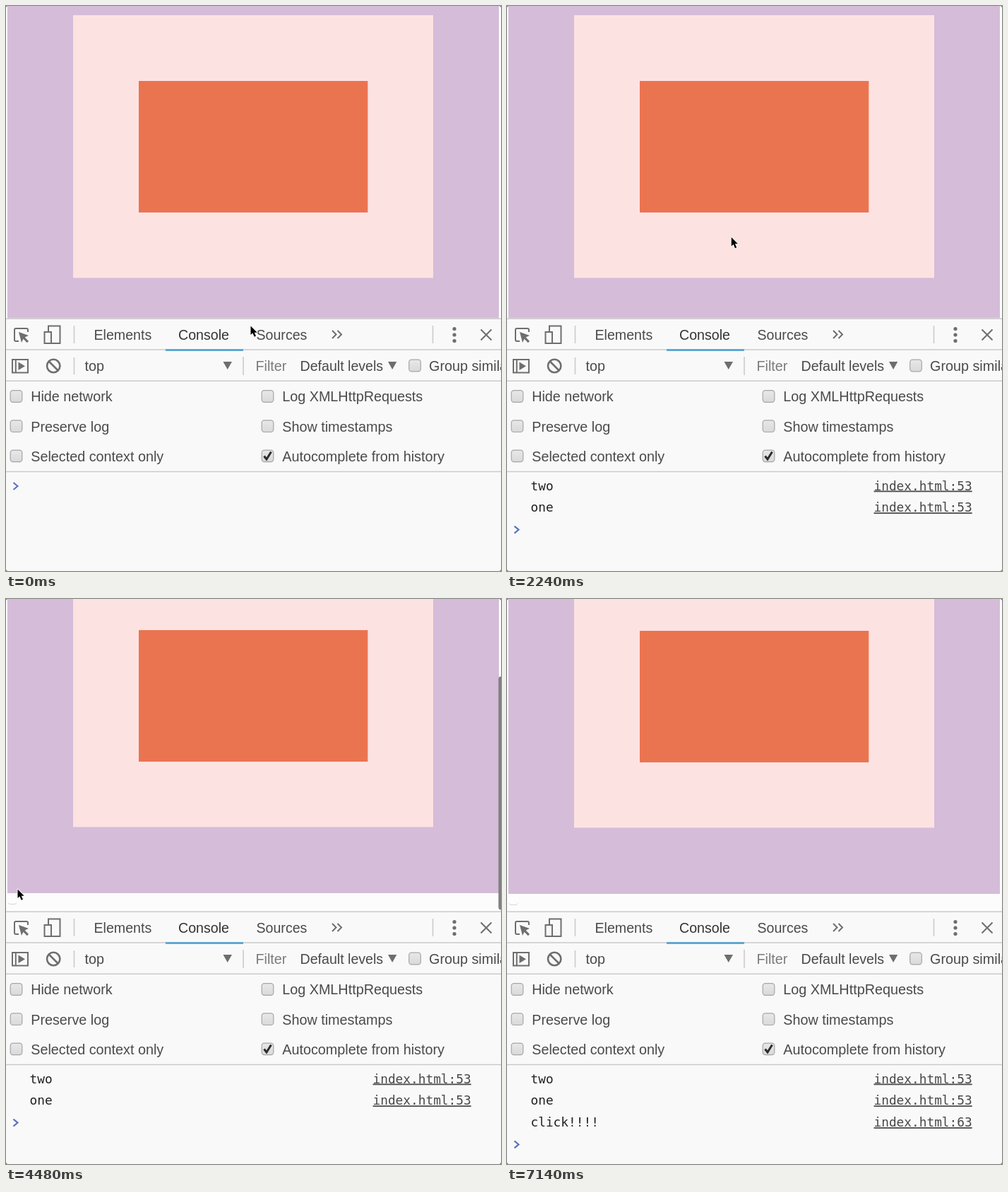
These frames come from a looping animation (701x799 px, 7.21 s). An HTML page:

```html
<!DOCTYPE html>
<html lang="en">
<head>
<meta charset="utf-8">
<title>Event bubbling in the console</title>
<style>
  html, body { margin: 0; width: 100%; height: 100%; overflow: hidden; background: #fcfcfc; }
  svg { display: block; width: 100vw; height: 100vh; }
  text { font: 19.8px "Liberation Sans", Arial, sans-serif; fill: #4a4a4a; white-space: pre; }
  .tab { font-size: 19.6px; }
  .log text { font: 17.8px "DejaVu Sans Mono", monospace; fill: #222; }
  .log .link { fill: #484848; text-decoration: underline; }
  .icon { fill: none; stroke: #6e6e6e; stroke-width: 2; }
  .solid { fill: #6e6e6e; }
  .rule { stroke: #cbcbcb; stroke-width: 1.6; }
  .box { fill: url(#shade); stroke: #a9a4aa; stroke-width: 1.2; }
</style>
</head>
<body>
<svg viewBox="0 0 701 799">
  <defs>
    <linearGradient id="shade" x2="0" y2="1">
      <stop stop-color="#e8e8e8"/><stop offset="1" stop-color="#d9d9d9"/>
    </linearGradient>
    <rect id="check" class="box" x="-8.3" y="-8.3" width="16.6" height="16.6" rx="3.6"/>
  </defs>

  <g id="page">
    <rect x="2" y="-80" width="696" height="558" fill="#d5bcd9"/>
    <rect x="95" y="13" width="510" height="371.5" fill="#fde2e2"/>
    <rect x="188" y="106" width="324.3" height="186" fill="#eb7450"/>
    <rect x="2.5" y="481" width="13" height="12.4" rx="3" fill="#fdfdfd"/>
    <path d="M3 491.5q.6 2 3 2h6q2.400 0 3-2" fill="none" stroke="#d6d6d6"/>
  </g>
  <rect id="thumb" x="697.4" width="7.6" height="330" rx="3.8" fill="#7f7f7f"/>

  <rect y="441.500" width="701" height="358" fill="#f9f9f9"/>
  <path class="rule" d="M0 442.300H701M0 486H701M0 530.300H701M0 658.500H701M96.500 452V477M604.500 452V477M96.500 497V521M336 496V522"/>
  <rect x="226" y="485.300" width="110" height="2.500" fill="#4a9fd0"/>

  <!-- tab bar -->
  <path class="icon" d="M18 474H14q-2 0-2-2V458q0-2 2-2H29q2 0 2 2V461"/>
  <path class="solid" d="M18 461L32 466 26.700 468.600 32 474 29.800 476.200 24.500 470.800 22 476Z"/>
  <path class="icon" d="M60 461V452.500H76.500V477H64M54.500 461H64V477H54.500Z"/>
  <text class="tab" x="124.500" y="472">Elements</text>
  <text class="tab" x="244" y="472" style="fill:#333">Console</text>
  <text class="tab" x="354.500" y="472">Sources</text>
  <path class="icon" d="M462 459L467.500 464.500 462 470M469.500 459L475 464.500 469.500 470"/>
  <g class="solid">
    <circle cx="635" cy="456.500" r="2.600"/><circle cx="635" cy="465" r="2.600"/><circle cx="635" cy="473.500" r="2.600"/>
  </g>
  <path class="icon" d="M672.500 457.500L687.500 472.500M687.500 457.500L672.500 472.500" stroke-width="2.400"/>

  <!-- console toolbar -->
  <path class="icon" d="M9 500H31V518.500H9ZM13.800 500V518"/>
  <path class="solid" d="M17.500 503.500L27 509.200 17.500 515Z"/>
  <circle class="icon" cx="67.200" cy="509" r="9.200" style="stroke-width:2.600"/>
  <path class="icon" d="M60.700 502.500L73.700 515.500" style="stroke-width:2.600"/>
  <text x="111.500" y="516">top</text>
  <path class="solid" d="M307.500 503H320L313.700 514ZM541 503H553.300L547.100 514Z"/>
  <text x="353.500" y="516" style="fill:#7b7b7b">Filter</text>
  <text class="tab" x="416.500" y="516">Default levels</text>
  <text x="599" y="516">Group similar</text>
  <use href="#check" x="579" y="508.500"/>

  <!-- settings -->
  <g id="settings"></g>
  <path d="M365.500 636.500L369 641 375.500 630.500" fill="none" stroke="#2c2c2c" stroke-width="3"/>

  <!-- console output -->
  <g class="log" id="log"></g>
  <path id="prompt" d="M10.500-5L16.500 0 10.500 5" fill="none" stroke="#5872c0" stroke-width="2.100"/>

  <path d="M0 0H2L0 2ZM701 0V2L699 0ZM0 799V797L2 799ZM701 799H699L701 797Z" fill="#777"/>
  <path id="cursor" d="M0 0V12.600L2.900 10 5.200 15.300 7.500 14.300 5.200 9.200H9.200Z" fill="#000" stroke="#fff" stroke-width="1.800" stroke-linejoin="round" paint-order="stroke"/>
</svg>
<script>
  const LOOP = 7210, TICK = 70;
  const $ = id => document.getElementById(id);

  // each key: time, values...
  const path = [
    [0, 346.5, 452.5], [140, 346.5, 452.5], [700, 345.5, 240.5], [1540, 345.5, 240.5],
    [1750, 343, 325], [2100, 343, 325], [2800, 100, 345], [3220, 69.5, 408.5],
    [3360, 69.5, 408.5], [3570, 59.5, 379], [4270, 59.5, 379], [4480, 16.5, 410.5],
    [4760, 11.5, 427], [6370, 11.5, 427], [6930, 50, 804]
  ];
  const scroll = [[3570, 0], [3850, 24.3], [4200, 24.3], [4410, 62], [4480, 62], [4620, 61]];
  const fade = [[3500, 0], [3570, 1], [4620, 1], [4900, 0]];
  const lines = [
    { at: 1820, msg: "two", from: "index.html:53" },
    { at: 1820, msg: "one", from: "index.html:53" },
    { at: 5110, msg: "click!!!!", from: "index.html:63" }
  ];
  const options = [
    ["Hide network", "Log XMLHttpRequests"],
    ["Preserve log", "Show timestamps"],
    ["Selected context only", "Autocomplete from history"]
  ];
  const ROW = 30.8;

  $("settings").innerHTML = options.map((pair, row) => pair.map((label, col) => {
    const x = 14.5 + col * 356, y = 552 + row * 42.2;
    return `<use href="#check" x="${x}" y="${y}"/><text x="${x + 20.7}" y="${y + 7.3}">${label}</text>`;
  }).join("")).join("");

  $("log").innerHTML = lines.map((line, i) => {
    const y = 684.5 + i * ROW;
    return `<g><text x="33.5" y="${y}">${line.msg}</text><text class="link" x="519.5" y="${y}">${line.from}</text></g>`;
  }).join("");
  const rows = [...$("log").children];

  function sample(keys, t) {
    const next = keys.findIndex(k => k[0] > t);
    if (next === 0) return keys[0].slice(1);
    if (next < 0) return keys[keys.length - 1].slice(1);
    const a = keys[next - 1], b = keys[next];
    const u = (t - a[0]) / (b[0] - a[0]);
    const e = u * u * (3 - 2 * u);
    return a.slice(1).map((v, i) => v + (b[i + 1] - v) * e);
  }

  function draw(now) {
    const t = Math.floor((now % LOOP) / TICK) * TICK;
    const [x, y] = sample(path, t);
    const [s] = sample(scroll, t);
    $("cursor").setAttribute("transform", `translate(${x} ${y})`);
    $("page").setAttribute("transform", `translate(0 ${-Math.round(s)})`);
    $("thumb").setAttribute("y", 63 + s * 0.75);
    $("thumb").setAttribute("opacity", sample(fade, t)[0]);

    let shown = 0;
    rows.forEach((row, i) => {
      const on = t >= lines[i].at;
      row.setAttribute("visibility", on ? "visible" : "hidden");
      shown += on;
    });
    $("prompt").setAttribute("transform", `translate(0 ${679 + shown * ROW})`);
  }

  const start = performance.now();
  function frame() {
    draw(performance.now() - start);
    requestAnimationFrame(frame);
  }
  frame();
</script>
</body>
</html>
```
